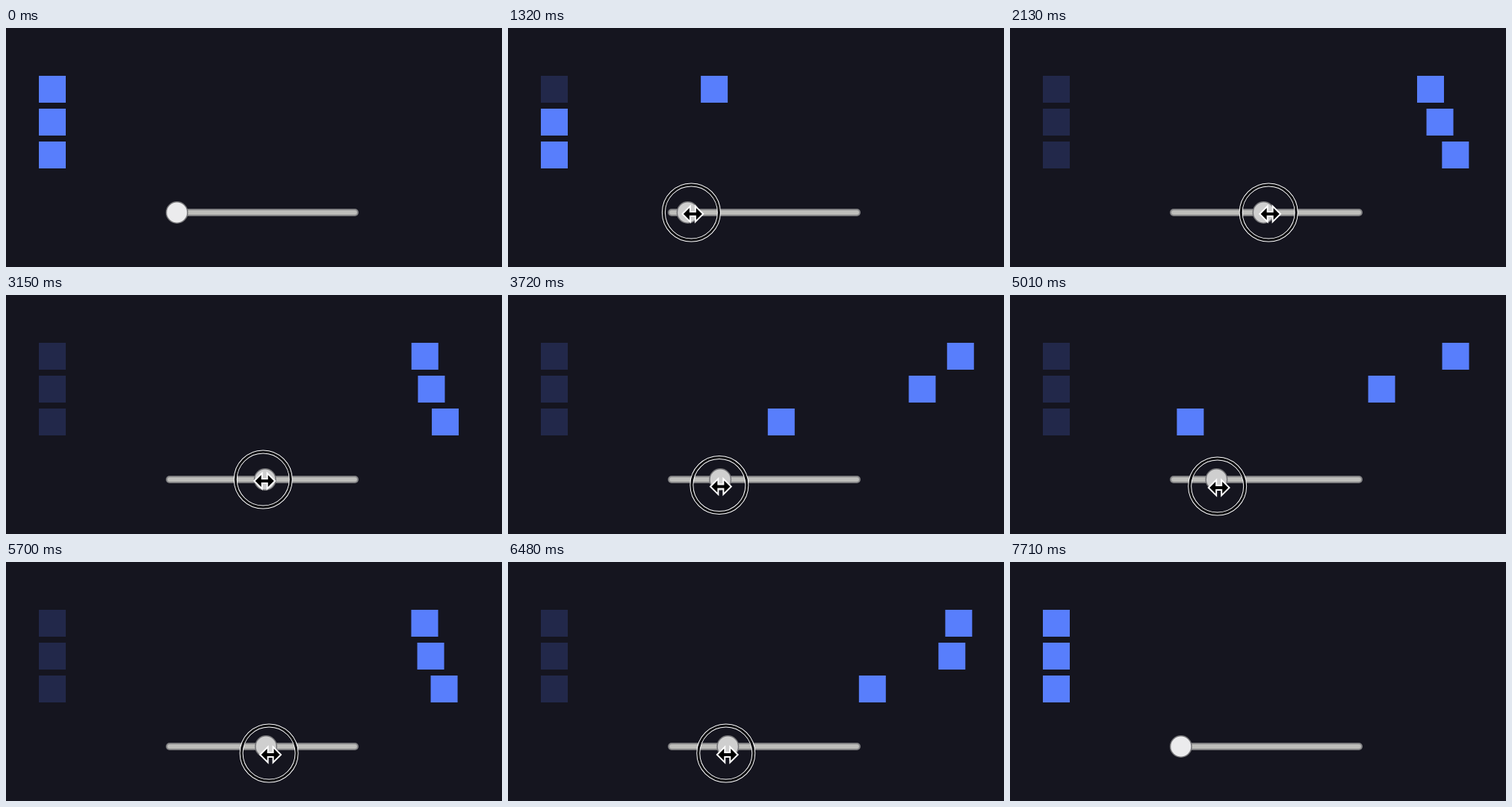
These frames come from a looping animation (664 by 320 pixels, 7.74 s). An HTML page with a canvas:

```html
<!DOCTYPE html>
<html lang="en">
<head>
<meta charset="utf-8">
<title>Seek slider</title>
<style>
  html, body { margin: 0; width: 100%; height: 100%; overflow: hidden; background: #15151f; }
  canvas { display: block; }
</style>
</head>
<body>
<canvas id="stage" width="664" height="320"></canvas>
<script>
const ctx = document.getElementById('stage').getContext('2d');
const LOOP = 7740, ENTER = 60, PRESS = 690, RELEASE = 7410, LEAVE = 7710;
const LAG = 40; // the slider trails the pointer

// Turning points of the pointer: time, x
const turns = [
  [ENTER, 244], [720, 225], [930, 225], [2650, 380], [3920, 276], [4560, 340], [4990, 277.5],
  [5750, 353], [6850, 270], [7280, 185], [RELEASE, 206], [7590, 206], [LEAVE, 230]
];

function ramp(t, from, to) {
  const u = Math.min(Math.max((t - from) / (to - from), 0), 1);
  return u * u * (3 - 2 * u);
}

function pointerX(t) {
  return turns.reduce((x, [time, next], i) =>
    i ? x + (next - turns[i - 1][1]) * ramp(t, turns[i - 1][0], time) : next, 0);
}

// The hand comes from below, sinks a little while dragging, then leaves downwards
function pointerY(t) {
  return 326 - 79 * ramp(t, ENTER, 720) + 9 * ramp(t, 3200, 3900) + 10 * ramp(t, 6500, 7140)
    - 13 * ramp(t, 7280, RELEASE) + 82 * ramp(t, 7590, LEAVE);
}

function progressAt(t) {
  if (t > 7170) return 0;
  return t < 930 ? 0 : Math.min(Math.max((pointerX(t - LAG) - 229.8) / 229, 0), 1);
}

function elasticOut(t) {
  return t <= 0 ? 0 : 1 - 2 ** (-10 * t) * Math.cos(2 * Math.PI * t / .8);
}

function square(x, row, color) {
  ctx.fillStyle = color;
  ctx.fillRect(x, 64 + 44 * row, 36, 36);
}

function disc(x, y, r, color) {
  ctx.fillStyle = color;
  ctx.beginPath();
  ctx.arc(x, y, r, 0, 2 * Math.PI);
  ctx.fill();
}

function bar(x, y, w, h, color) {
  ctx.fillStyle = color;
  ctx.beginPath();
  ctx.roundRect(x, y, w, h, h / 2);
  ctx.fill();
}

function ring(x, y, width, color) {
  ctx.strokeStyle = color;
  ctx.lineWidth = width;
  ctx.beginPath();
  ctx.arc(x, y, 37, 0, 2 * Math.PI);
  ctx.stroke();
}

const arrows = new Path2D('M-12.5 0L-4.5-8V-2H4.5V-8L12.5 0L4.5 8V2H-4.5V8Z');

function resizeCursor(x, y) {
  ctx.save();
  ctx.translate(x + 2, y + 2);
  ctx.strokeStyle = '#fff';
  ctx.lineWidth = 4;
  ctx.stroke(arrows);
  ctx.fillStyle = '#000';
  ctx.fill(arrows);
  ctx.restore();
}

function draw(t) {
  const progress = progressAt(t);
  const pressed = t >= PRESS && t < RELEASE;

  ctx.fillStyle = '#15151f';
  ctx.fillRect(0, 0, 664, 320);

  for (let row = 0; row < 3; row++) {
    square(44, row, '#22284a');
    square(44 + 500 * elasticOut(progress * 1.2 - row * .1), row, '#587efc');
  }

  bar(214, 242, 258, 10, '#828284');
  bar(216, 244, 254, 6, '#bdbdba');
  const thumb = 228.8 + 227 * progress;
  disc(thumb, 247, 15, '#747477');
  disc(thumb, 247, 13.5, pressed ? '#cfcfcf' : '#ebebed');

  if (t >= ENTER && t < LEAVE) {
    const x = pointerX(t), y = pointerY(t);
    if (pressed) {
      ring(x, y, 5, '#fff');
      ring(x, y, 3, '#08080c');
    }
    resizeCursor(x, y);
  }
}

const start = performance.now();
function tick() {
  draw((performance.now() - start) % LOOP);
  requestAnimationFrame(tick);
}
tick();
</script>
</body>
</html>
```
